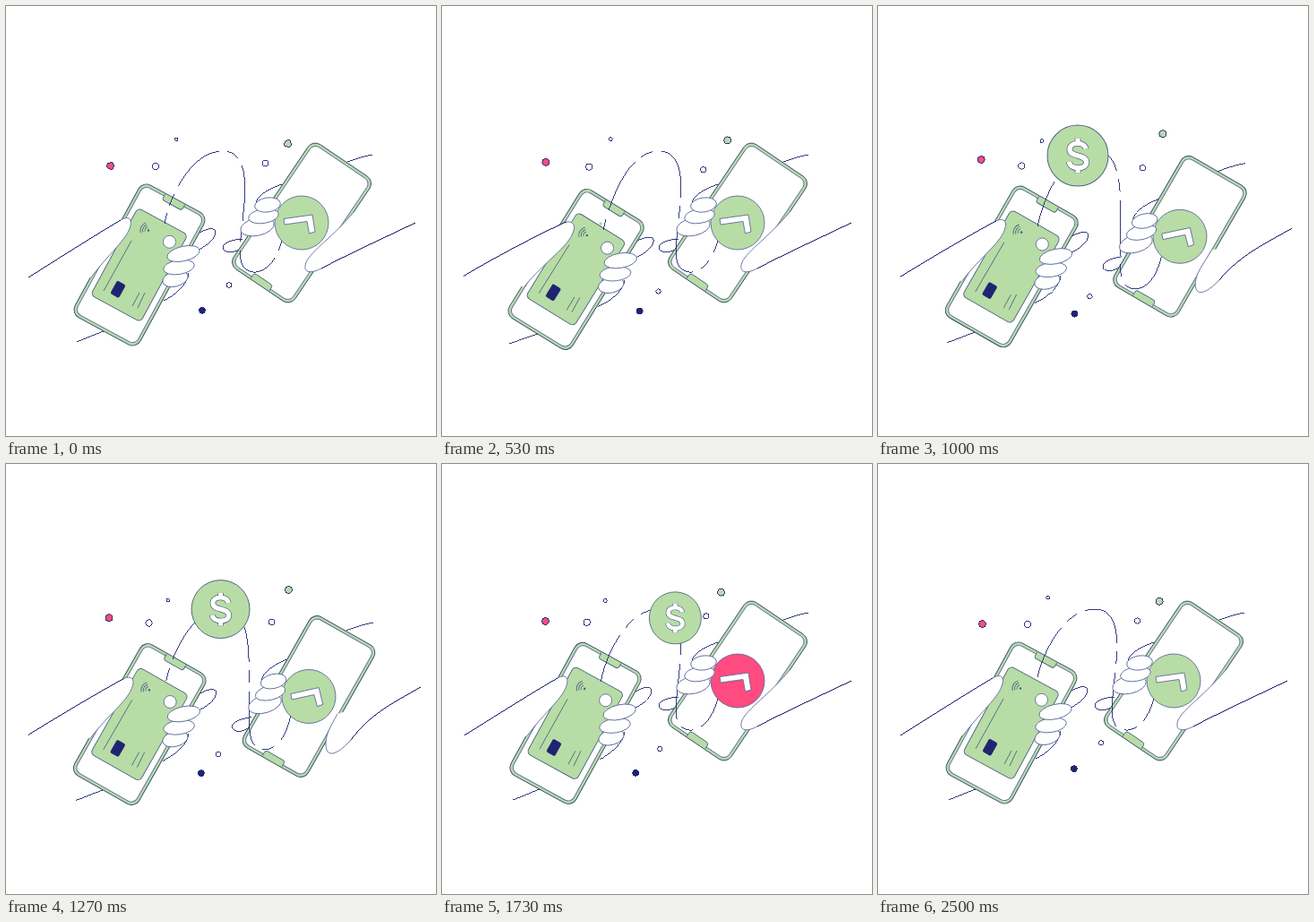
An HTML page that plays this animation: 480 px wide and 480 px high, repeating every 2530 ms.

```html
<!DOCTYPE html>
<html lang="en">
<head>
<meta charset="utf-8">
<title>Phone payment</title>
<style>
  html, body { margin: 0; width: 100%; height: 100%; overflow: hidden; background: #fff; }
  svg { display: block; width: 100%; height: 100%; }
  .line { fill: none; stroke: #1f2472; stroke-width: .9; shape-rendering: crispEdges; }
  .skin { fill: #fff; stroke: #5e6b9a; stroke-width: .9; }
  .dark { stroke: #1f2472; shape-rendering: crispEdges; }
  .fine { fill: none; stroke: #4c6480; stroke-width: .9; }
  .green { fill: #b8dca5; stroke: #4c6480; stroke-width: .9; }
  .edge { stroke: #33496f; }
  .navy { fill: #1f2472; }
</style>
</head>
<body>
<svg viewBox="0 0 480 480">
  <defs>
    <g id="phone">
      <rect class="green edge" x="-41.5" y="-84" width="83" height="168" rx="10"/>
      <rect class="skin" x="-38.3" y="-80.8" width="76.6" height="161.6" rx="7.5"/>
      <path class="green" d="M-12.5-83v4q0 3 3 3h19q3 0 3-3v-4"/>
    </g>
    <path id="dollar" fill="none" d="M8-6.5C7-14-8-14-8-6C-8 2 8.5-2 8.5 6.5C8.5 14-8 14-8.5 6M0-17V-11.5M0 11.5V17"/>
  </defs>

  <g id="dots"></g>

  <path id="leftSleeve" class="line"/>
  <g class="left">
    <path class="skin dark" d="M203 263C215 252 228 246 233 250C236 256 228 266 213 273"/>
    <path class="line" d="M204 298C203 310 190 322 176 329"/>
    <use href="#phone" transform="translate(149 289) rotate(28.5)"/>
    <g transform="translate(148.7 289) rotate(28.5)">
      <rect class="green" x="-31.7" y="-55.4" width="63.4" height="110.8" rx="5"/>
      <rect class="navy" x="-13.3" y="27" width="11" height="16.5" rx="2"/>
    </g>
    <path class="fine" d="M140 262L109 318M149 320L141 335M155 320L147 337"/>
    <g class="fine" transform="translate(159 250.5) rotate(28.5)">
      <circle class="navy" r=".8"/>
      <path d="M-2.8-2.8a4 4 0 0 0 0 5.6M-4.6-4.6a6.5 6.5 0 0 0 0 9.2M-6.4-6.4a9 9 0 0 0 0 12.8"/>
    </g>
    <circle class="skin" cx="182.5" cy="263.3" r="7"/>
  </g>

  <path id="rightSleeve" class="line"/>
  <g class="right">
    <path class="skin dark" d="M264 260C250 261 242 265 242 269C243 276 252 276 260 272"/>
    <path class="line" d="M312 198C297 202 283 209 279 219"/>
    <use href="#phone" transform="translate(330 242) rotate(214)"/>
  </g>

  <path id="route" class="line" stroke-dasharray="14 10 62 9"/>

  <g class="left">
    <ellipse class="skin" rx="14.5" ry="8.5" transform="translate(189 304.5) rotate(-16)"/>
    <ellipse class="skin" rx="17.5" ry="8" transform="translate(193 291.5) rotate(-9)"/>
    <ellipse class="skin" rx="18.5" ry="8.2" transform="translate(198 276.5) rotate(-13)"/>
  </g>
  <path id="leftThumb" class="skin"/>
  <path id="leftArm" class="line"/>

  <g class="right">
    <circle id="badge" class="skin" cx="330" cy="242" r="30"/>
    <path class="skin" d="M310 237.5L342 233L345 252L338.5 254L336 240.5L311 244Z"/>
    <ellipse class="skin" rx="19" ry="9.8" transform="translate(280.5 246.5) rotate(-12)"/>
    <ellipse class="skin" rx="17" ry="8" transform="translate(287.5 234.5) rotate(-9)"/>
    <ellipse class="skin" rx="14.5" ry="8" transform="translate(292 222) rotate(-8)"/>
  </g>
  <path id="rightThumb" class="skin"/>
  <path id="rightArm" class="line"/>

  <g id="coin">
    <circle class="green" r="30"/>
    <use href="#dollar" stroke="#4c6480" stroke-width="6"/>
    <use href="#dollar" stroke="#fff" stroke-width="4.7"/>
  </g>
</svg>

<script>
const LOOP = 2530;
const $ = id => document.getElementById(id);
const setPath = (id, d) => $(id).setAttribute('d', d);

const linear = (t, from, to) => Math.min(1, Math.max(0, (t - from) / (to - from)));
const ease = (t, from, to) => {
  const u = linear(t, from, to);
  return u * u * (3 - 2 * u);
};

// Mixes the numbers of two strings of the same form
const NUM = /-?\d+(\.\d+)?/g;
function blend(a, b, k) {
  const goal = b.match(NUM);
  let i = 0;
  return a.replace(NUM, v => +v + (goal[i++] - v) * k);
}

// Left hand: flick up, overshoot, settle. Right hand: dip and return.
const leftSwing = t => ease(t, 60, 330) - 1.58 * ease(t, 340, 610)
  + .48 * ease(t, 620, 800) + .1 * ease(t, 1000, 2000);
const rightSwing = t => ease(t, 690, 1090) - ease(t, 1280, 1610);

// The coin shoots up, hangs at the top, then drops and shrinks
const coinAlong = t => 98 * ease(t, 640, 1070) + 35 * linear(t, 1070, 1730)
  + 160 * linear(t, 1730, 2050) ** 2;
const coinRadius = t => 34 * ease(t, 480, 860) - 5 * linear(t, 1070, 1730)
  - 29 * ease(t, 1730, 2030);

// A swing turns a hand and phone about the phone's centre and shifts them
const pose = (cx, cy, dx, dy, turn, k) => ({ cx, cy, dx: dx * k, dy: dy * k, turn: turn * k });
function setPose(name, p) {
  document.querySelectorAll(name).forEach(g => g.setAttribute('transform',
    `translate(${p.dx} ${p.dy}) rotate(${p.turn} ${p.cx} ${p.cy})`));
}
function place(p, x, y) {
  const a = p.turn * Math.PI / 180, c = Math.cos(a), s = Math.sin(a);
  x -= p.cx; y -= p.cy;
  return [p.cx + p.dx + x * c - y * s, p.cy + p.dy + x * s + y * c];
}

// Dashed route between the phones; both ends move with them
function routePath(left, right, k) {
  const L = (x, y) => place(left, x, y), R = (x, y) => place(right, x, y);
  return `M${L(177, 243)}C${L(182, 214)} 206 163 241 162`
    + `C264 161 ${267 + 3 * k} 186 ${267 + 4 * k} ${208 + 9 * k}`
    + `C${R(265, 240)} ${R(258, 275)} ${R(263, 287)}C${R(270, 304)} ${R(297, 302)} ${R(308, 262)}`;
}

const svgNode = name => document.createElementNS('http://www.w3.org/2000/svg', name);
const REST = pose(0, 0, 0, 0, 0, 0);
const coinRoute = svgNode('path');
coinRoute.setAttribute('d', routePath(REST, REST, 0));

// Each dot floats once round a tilted ellipse: home, reach to the far side, sideways bulge
function dot(r, fill, home, reach, bulge) {
  const node = $('dots').appendChild(svgNode('circle'));
  node.setAttribute('class', 'line');
  node.setAttribute('r', r);
  node.style.fill = fill;
  return angle => ['cx', 'cy'].forEach((name, i) => node.setAttribute(name,
    home[i] + reach[i] * (1 - Math.cos(angle)) / 2 + bulge[i] * Math.sin(angle)));
}
const dots = [
  dot(4, '#ff4b80', [116.5, 178.5], [-1.5, -6.7], [0, -1.7]),
  dot(3.7, '#fff', [167, 179], [-7.5, -1.5], [0, 1.3]),
  dot(2, '#fff', [190, 149], [-9, 3], [1.7, -1.5]),
  dot(4, '#b8dca5', [314.5, 153.5], [1, -13], [4, 1.2]),
  dot(3.2, '#fff', [289.5, 175.5], [7, 1], [-.5, 7]),
  dot(2.7, '#fff', [249, 311.5], [-12, 12.5], [-3, 2.5]),
  dot(3.5, '#1f2472', [219, 340], [-1, 5], [2.2, -1.5]),
];

function draw(t) {
  const kl = leftSwing(t), kr = rightSwing(t);
  const left = pose(149, 289, -2.5, -19.5, -12.5, kl);
  const right = pose(330, 242, 8, 17.5, -4.5, kr);
  setPose('.left', left);
  setPose('.right', right);

  const leftArm = blend('M25 303C60 281 104 253 128 239', 'M27 310C55 288 70 255 86 231', kl);
  setPath('leftArm', leftArm);
  setPath('leftThumb', leftArm + blend('C136 234 141 237 139 245C136 260 114 277 95 303',
    'C98 212 106 206 110 216C114 226 112 244 108 262', kl));
  setPath('leftSleeve', blend('M79 375L116 360', 'M95 367L128 345', kl));

  const rightArm = blend('M457 242C430 255 380 278 352 293',
    'M463 249C430 268 408 278 385 308', kr);
  setPath('rightArm', rightArm);
  setPath('rightThumb', rightArm + blend('C338 300 331 297 335 286C341 273 366 257 388 230',
    'C370 325 357 329 357 313C357 302 361 295 370 279', kr));
  setPath('rightSleeve', blend('M409 166C398 168 388 171 374 177',
    'M410 177C399 179 389 182 375 188', kr));

  setPath('route', routePath(left, right, kr));
  $('route').setAttribute('stroke-dashoffset', -(21 + .136 * t));

  const spot = coinRoute.getPointAtLength(coinAlong(t));
  const size = Math.max(0, coinRadius(t)) / 30;
  $('coin').setAttribute('transform', `translate(${spot.x} ${spot.y}) scale(${size})`);

  const pink = ease(t, 1560, 1660) - ease(t, 2200, 2330);
  $('badge').style.fill = blend('rgb(184,220,165)', 'rgb(255,75,128)', pink);
  dots.forEach(move => move(2 * Math.PI * t / LOOP));
}

function tick() {
  draw(performance.now() % LOOP);
  requestAnimationFrame(tick);
}
tick();
</script>
</body>
</html>
```
